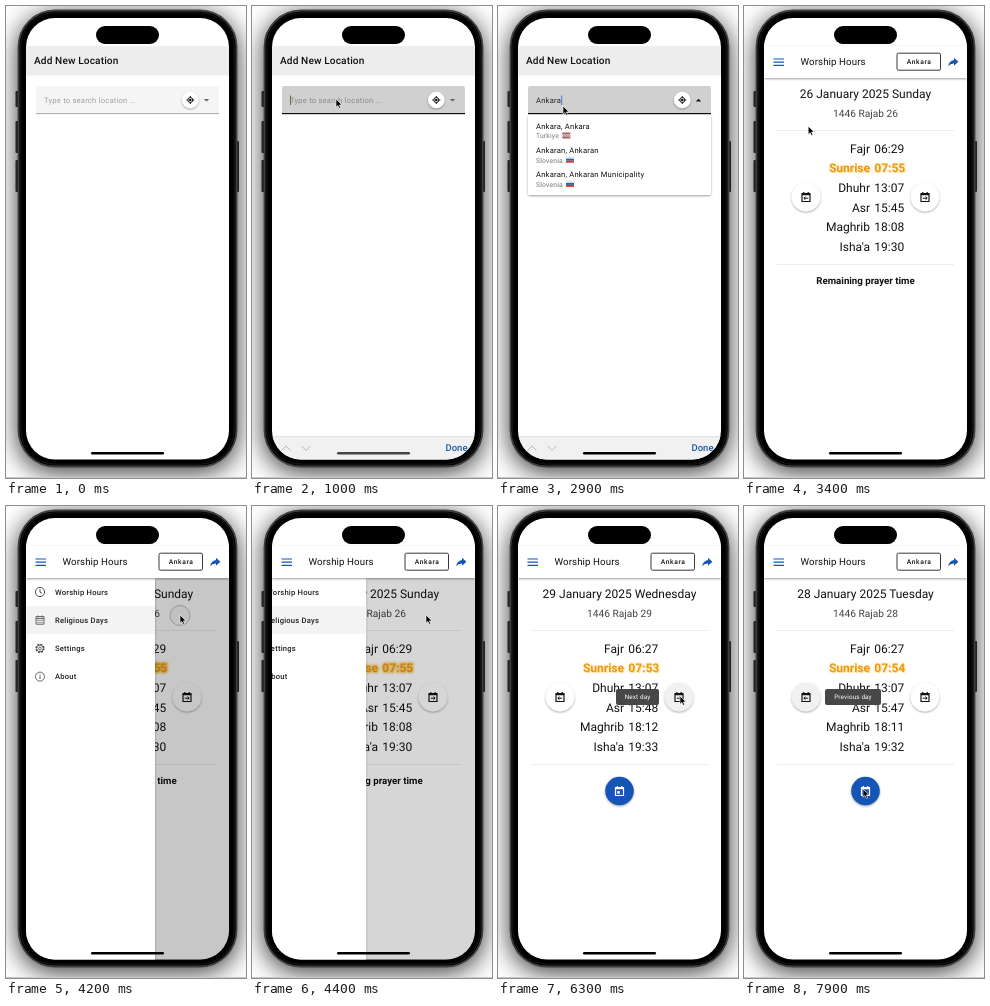
An HTML page that plays this animation: 240 px wide and 472 px high, repeating every 8 s.

```html
<!DOCTYPE html>
<html lang="en">
<head>
<meta charset="utf-8">
<title>Location and times</title>
<style>
  html, body { margin: 0; width: 100%; height: 100%; overflow: hidden; background: #fff; }
  svg { display: block; width: 240px; height: 472px; font-family: Roboto, sans-serif; text-rendering: geometricPrecision; }
  text { white-space: pre; }
  .body { font-size: 7.6px; letter-spacing: .22px; }
  .small { font-size: 6.8px; letter-spacing: .18px; fill: #777; }
  .row { font-size: 12px; fill: #111; }
  .mid { text-anchor: middle; }
  .end { text-anchor: end; }
  .medium { font-weight: 500; }
  .bold { font-weight: 700; }
  .line { fill: none; stroke: currentColor; }
</style>
</head>
<body>
<svg id="stage" viewBox="0 0 240 472"></svg>
<script>
const LOOP = 8000;
const BLUE = '#1555b5';

const days = [
  ['26 January 2025 Sunday', '1446 Rajab 26', '06:29 07:55 13:07 15:45 18:08 19:30'],
  ['27 January 2025 Monday', '1446 Rajab 27', '06:28 07:55 13:07 15:46 18:09 19:31'],
  ['28 January 2025 Tuesday', '1446 Rajab 28', '06:27 07:54 13:07 15:47 18:11 19:32'],
  ['29 January 2025 Wednesday', '1446 Rajab 29', '06:27 07:53 13:07 15:48 18:12 19:33']
];
const labels = ['Fajr', 'Sunrise', 'Dhuhr', 'Asr', 'Maghrib', "Isha'a"];
const dayAt = [[0, 0], [5330, 1], [5670, 2], [6000, 3], [6900, 2]];
const nextClicks = [5330, 5670, 6000];
const prevClicks = [6900];
const keyTimes = [1300, 1450, 1650, 1900, 2050, 2180];
const pointer = [
  [300, 118, 150], [650, 84, 93], [1400, 84, 93], [1800, 65, 100], [2950, 65, 100],
  [3120, 66, 124], [3350, 66, 124], [3700, 35, 58], [3840, 35, 58], [4000, 72, 111],
  [4160, 174, 109], [4400, 174, 109], [5150, 182, 190], [6420, 182, 190],
  [6700, 66, 190], [7380, 70, 190], [7800, 119, 283], [8000, 119, 283]
];

const rect = (x, y, w, h, fill, extra = '') =>
  `<rect x="${x}" y="${y}" width="${w}" height="${h}" fill="${fill}" ${extra}/>`;
const text = (x, y, str, cls = '', extra = '') =>
  `<text x="${x}" y="${y}" class="${cls}" ${extra}>${str}</text>`;
const path = (d, extra = '') => `<path d="${d}" class="line" ${extra}/>`;

// Calendar icon centred on 0,0 with its own inner mark
const calendar = inner => path('M-4-3.5H4V4.5H-4ZM-4-2.3H4M-2.2-5V-3M2.2-5V-3', 'stroke-width="1.2"') + inner;
const arrow = dir => path('M-2.2 1.2H2M.5-.4 2.2 1.2 .5 2.8', `stroke-width="1" transform="scale(${dir} 1)"`);
const fab = (id, x, y, fill, color, icon) => `
  <g transform="translate(${x} ${y})" color="${color}">
    <circle id="${id}" r="14.3" fill="${fill}" filter="url(#lift)"/>${icon}
  </g>`;
const tooltip = (id, x, w, str) => `
  <g id="${id}">${rect(x, 183, w, 16, '#474747', 'rx="2"')}
    ${text(x + w / 2, 193.2, str, 'mid', 'font-size="6.3" letter-spacing=".15" fill="#fff"')}</g>`;
const flag = (x, y, colors) =>
  colors.map((c, i) => rect(x, y + i * 2, 8, 2, c)).join('');

const option = (y, name, country, colors) =>
  text(38, y, name, 'body', 'fill="#111"') + text(38, y + 9.4, country, 'small') +
  flag(country === 'Turkiye' ? 64.3 : 68, y + 3.5, colors);

const slovenia = ['#e4e4ee', '#2b62b8', '#d23a3a'];
const turkiye = ['#a8655f', '#b9aaa7', '#a8655f'];

const searchPage = `
  <g id="search">
    ${rect(20, 40, 203, 29.5, '#ededed')}
    ${text(28, 58.4, 'Add New Location', 'medium', 'font-size="10.1" letter-spacing=".12" fill="#111"')}
    <path id="field" d="M30 108V82q0-2 2-2H211q2 0 2 2V108Z"/>
    <rect id="underline" x="30" width="183"/>
    <text id="input" x="38" y="96.9" class="body"></text>
    <rect id="caret" y="89.5" width="1" height="9.5" fill="#3b7ddd"/>
    <circle cx="184.3" cy="94" r="8.3" fill="#fff" filter="url(#lift)"/>
    <g color="#111" transform="translate(184.3 94)">
      <circle r="2.5" class="line"/><circle r="1.2"/>
      ${path('M0-4V-2.5M0 4V2.5M-4 0H-2.5M4 0H2.5')}
    </g>
    <path id="drop" d="M-2.7-1.3H2.7L0 1.4Z"/>
    <g id="options">
      ${rect(30, 109, 183, 80, '#fff', 'rx="2" filter="url(#lift)"')}
      ${rect(30, 109, 183, 25, '#f2f2f2', 'id="hover"')}
      ${option(123, 'Ankara, Ankara', 'Turkiye', turkiye)}
      ${option(147.2, 'Ankaran, Ankaran', 'Slovenia', slovenia)}
      ${option(171.4, 'Ankaran, Ankaran Municipality', 'Slovenia', slovenia)}
    </g>
    <g id="accessory">
      ${rect(20, 430.5, 203, 24, '#f1f1f1')}${rect(20, 430.5, 203, .6, '#d0d0d0')}
      <g color="#b8b8b8">${path('M29.5 444.5 34 440 38.5 444.5M49.5 440 54 444.5 58.5 440')}</g>
      ${text(193.5, 445.3, 'Done', 'medium', `font-size="9.5" fill="#1f56a8"`)}
    </g>
  </g>`;

const gear = '<circle r="4" class="line" stroke-width="1.3" stroke-dasharray="1.9 1.24"/><circle r="3.3" class="line" stroke-width=".8"/><circle r="1.4" class="line" stroke-width=".8"/>';
const menuItems = [
  ['Worship Hours', '<circle r="4.6" class="line" stroke-width=".9"/>' + path('M0-2.8V.2L2 1.4', 'stroke-width=".9"')],
  ['Religious Days', path('M-4-3.6H4V4H-4ZM-4-1.6H4M-2-4.8V-2.8M2-4.8V-2.8', 'stroke-width=".8"') + path('M-2.5.2H2.6M-2.5 2.2H2.6', 'stroke-width="1" stroke-dasharray="1 1"')],
  ['Settings', gear],
  ['About', '<circle r="4.5" class="line" stroke-width=".8"/>' + path('M0-2.3V-1.3M0-.5V2.4', 'stroke-width=".9"')]
];
const menu = `
  <rect id="shade" x="20" y="72" width="203" height="382"/>
  <circle id="tap" cx="174" cy="109.5" r="10" fill="#000" fill-opacity=".03" stroke="#777" stroke-width=".6"/>
  <g id="menu">
    ${rect(20, 72, 129, 382, '#fff', 'filter="url(#lift)"')}
    ${rect(20, 100, 129, 28.2, '#f3f3f3', 'id="chosen"')}
    ${menuItems.map(([name, icon], i) => `
      <g transform="translate(34 ${86 + i * 28.2})" color="#444">${icon}</g>
      ${text(49, 88.7 + i * 28.2, name, 'body medium', 'fill="#222"')}`).join('')}
  </g>`;

const rows = labels.map((name, i) => {
  const y = 146.6 + i * 19.65, hot = i === 1;
  const pair = extra => text(126, y, name, 'row end' + (hot ? ' bold' : ''), extra) +
    text(130.3, y, '', 'row' + (hot ? ' bold' : ''), `data-time="${i}" ${extra}`);
  return hot
    ? `<g id="glow" filter="url(#soft)">${pair('style="fill:#ff9d00" stroke="#ffb020" stroke-width="2.5"')}</g>
       <g transform="translate(.9 .9)" opacity=".75">${pair('style="fill:#ffd873"')}</g>${pair('style="fill:#e99a17"')}`
    : pair('');
}).join('');

const timesPage = `
  <g id="times">
    <text id="date" x="121.5" y="92.3" class="mid" font-size="12" fill="#111"></text>
    <text id="hijri" x="121.5" y="111.3" class="mid" font-size="10.2" fill="#444"></text>
    ${rect(33, 124, 177, .7, '#e6e6e6')}${rect(33, 258, 177, .7, '#e6e6e6')}
    ${rows}
    ${fab('prev', 62, 191, '#fff', '#111', calendar(arrow(-1)))}
    ${fab('next', 181, 191, '#fff', '#111', calendar(arrow(1)))}
    ${text(121.5, 278.3, 'Remaining prayer time', 'mid bold', 'id="remaining" font-size="9.7" fill="#111"')}
    <g id="today">${fab('todayFab', 121.5, 285, BLUE, '#fff', calendar('<rect x="-2.3" y=".1" width="2.6" height="2.6" fill="#fff"/>'))}</g>
    ${tooltip('nextTip', 118, 43, 'Next day')}${tooltip('prevTip', 81, 56, 'Previous day')}
    ${menu}
    ${rect(20, 40, 203, 32, '#fff', 'filter="url(#lift)"')}
    <g color="${BLUE}">${path('M29.5 53H40M29.5 56.2H40M29.5 59.4H40', 'stroke-width="1.2"')}</g>
    ${text(56.5, 59.4, 'Worship Hours', '', 'font-size="9.7" letter-spacing=".1" fill="#111"')}
    <rect x="153" y="47.2" width="43.5" height="17" rx="1.5" fill="#fff" stroke="#222" stroke-width=".9"/>
    ${text(175.2, 58.2, 'Ankara', 'mid medium', 'font-size="6.7" letter-spacing=".65" fill="#111"')}
    <path d="M210 51.7 214.4 55.8 210 59.8V57.4Q206.3 57.2 204.2 60.2 205 54.8 210 54.1Z" fill="${BLUE}"/>
  </g>`;

const stage = document.getElementById('stage');
stage.innerHTML = `
  <defs>
    <clipPath id="screen"><rect x="20" y="12" width="203" height="441.5" rx="29"/></clipPath>
    <filter id="lift" x="-30%" y="-30%" width="160%" height="170%"><feDropShadow dx="0" dy="1" stdDeviation="1.1" flood-opacity=".38"/></filter>
    <filter id="soft" x="-20%" y="-60%" width="140%" height="220%"><feGaussianBlur stdDeviation="1.1"/></filter>
    <filter id="cast" x="-30%" y="-20%" width="160%" height="140%"><feGaussianBlur stdDeviation="13"/></filter>
  </defs>
  ${rect(0, 0, 240, 472, '#fff')}
  ${rect(12, 9, 219, 457, '#000', 'rx="36" opacity=".8" filter="url(#cast)"')}
  ${rect(0, 471, 240, 1, '#c8c8c8')}
  ${[[85, 16], [115, 32], [154, 32]].map(([y, h]) => rect(9.5, y, 4, h, '#222326', 'rx="1"')).join('')}
  ${rect(229, 135, 4, 51, '#222326', 'rx="1"')}
  <rect x="12.5" y="4.5" width="218" height="456" rx="36.5" fill="#000" stroke="#3d3f43" stroke-width="1.8"/>
  <rect x="14.8" y="6.8" width="213.4" height="451.4" rx="34" fill="#000" stroke="#17181a"/>
  <g clip-path="url(#screen)">
    ${rect(20, 12, 203, 442, '#fff')}${searchPage}${timesPage}
    ${rect(85, 446, 73, 2.6, '#000', 'id="home" rx="1.3"')}
  </g>
  ${rect(90, 20, 63, 18, '#000', 'rx="9"')}
  <path id="pointer" d="M0 0V8.2L1.9 6.5 3.2 9.3 4.6 8.7 3.4 5.9H6Z" fill="#000" stroke="#fff" stroke-width=".6"/>`;

const el = {};
stage.querySelectorAll('[id]').forEach(e => el[e.id] = e);
const times = [...stage.querySelectorAll('[data-time]')];

const show = (e, on) => e.style.display = on ? '' : 'none';
const set = (e, name, value) => e.setAttribute(name, value);
const clamp = v => Math.max(0, Math.min(1, v));
const ease = v => v * v * (3 - 2 * v);
const ramp = (t, from, to) => ease(clamp((t - from) / (to - from)));
const grey = v => `rgb(${[v, v, v].map(Math.round)})`;
const mix = (a, b, p) => a + (b - a) * p;

function along(track, t) {
  const i = track.findIndex(k => k[0] > t);
  if (i < 0) return track[track.length - 1].slice(1);
  if (i === 0) return track[0].slice(1);
  const [a, b] = [track[i - 1], track[i]];
  const p = ramp(t, a[0], b[0]);
  return [mix(a[1], b[1], p), mix(a[2], b[2], p)];
}

// Ripple darkness that fades after each press
const press = (clicks, t) => Math.max(0, ...clicks.map(c => t < c ? 0 : 1 - (t - c) / 260));

function drawSearch(t) {
  const focused = t >= 700;
  const typed = 'Ankara'.slice(0, keyTimes.filter(k => t >= k).length);
  const open = ramp(t, 2400, 2520) * (1 - ramp(t, 3200, 3300));
  set(el.field, 'fill', grey(mix(mix(245, 236, ramp(t, 500, 600)), 208, ramp(t, 700, 850))));
  set(el.underline, 'y', focused ? 107 : 107.4);
  set(el.underline, 'height', focused ? 1.2 : .7);
  set(el.underline, 'fill', focused ? '#111' : '#888');
  el.input.textContent = typed || 'Type to search location ...';
  set(el.input, 'fill', typed ? '#222' : focused ? '#8a8a8a' : '#a0a0a0');
  set(el.caret, 'x', typed ? 38.2 + el.input.getComputedTextLength() : 38);
  set(el.caret, 'fill', typed ? '#3b7ddd' : '#6b6440');
  show(el.caret, focused && (t < 1100 || t > 1250));
  set(el.drop, 'fill', open > 0 ? '#111' : '#666');
  set(el.drop, 'transform', `translate(200.5 94.2) scale(1 ${open > 0 ? -1 : 1})`);
  set(el.options, 'opacity', open);
  set(el.options, 'transform', `translate(0 ${109 * .2 * (1 - open)}) scale(1 ${.8 + .2 * open})`);
  show(el.hover, t > 3050);
  const up = ramp(t, 720, 940) * (1 - ramp(t, 3230, 3390));
  set(el.accessory, 'transform', `translate(0 ${24 * (1 - up)})`);
}

function drawTip(e, originX, level) {
  const s = .45 + .55 * level;
  show(e, level > 0);
  set(e, 'opacity', clamp(level * 2));
  set(e, 'transform', `translate(${originX * (1 - s)} ${191 * (1 - s)}) scale(${s})`);
}

function drawTimes(t) {
  const day = dayAt.filter(d => t >= d[0]).pop()[1];
  const [date, hijri, list] = days[day];
  const values = list.split(' ');
  el.date.textContent = date;
  el.hijri.textContent = hijri;
  times.forEach(e => e.textContent = values[e.dataset.time]);
  show(el.remaining, day === 0);
  show(el.today, day !== 0);
  set(el.glow, 'opacity', .1 + .8 * Math.pow(.5 + .5 * Math.cos((t - 4200) / 1500 * 2 * Math.PI), 2));

  const overNext = ramp(t, 5080, 5180) * (1 - ramp(t, 6480, 6580));
  set(el.next, 'fill', grey(255 - 14 * overNext - 98 * press(nextClicks, t)));
  set(el.prev, 'fill', grey(255 - 14 * ramp(t, 6640, 6720) - 98 * press(prevClicks, t)));
  drawTip(el.nextTip, 161, ramp(t, 5330, 5460) * (1 - ramp(t, 6480, 6560)));
  drawTip(el.prevTip, 81, ramp(t, 6700, 6840));

  const open = ramp(t, 3820, 4040) * (1 - ramp(t, 4320, 4560));
  show(el.menu, open > 0);
  set(el.menu, 'transform', `translate(${-132 * (1 - open)} 0)`);
  set(el.shade, 'opacity', .22 * open);
  show(el.chosen, t > 3970);
  show(el.tap, t > 4160 && t < 4340);
}

function render(t) {
  const searching = t < 3400;
  show(el.search, searching);
  show(el.times, !searching);
  searching ? drawSearch(t) : drawTimes(t);
  set(el.home, 'fill', t > 760 && t < 1700 ? '#444' : '#000');
  const [x, y] = along(pointer, t);
  show(el.pointer, t >= 300);
  set(el.pointer, 'transform', `translate(${x} ${y})`);
}

const start = performance.now();
function tick() {
  render((performance.now() - start) % LOOP);
  requestAnimationFrame(tick);
}
tick();
</script>
</body>
</html>
```
